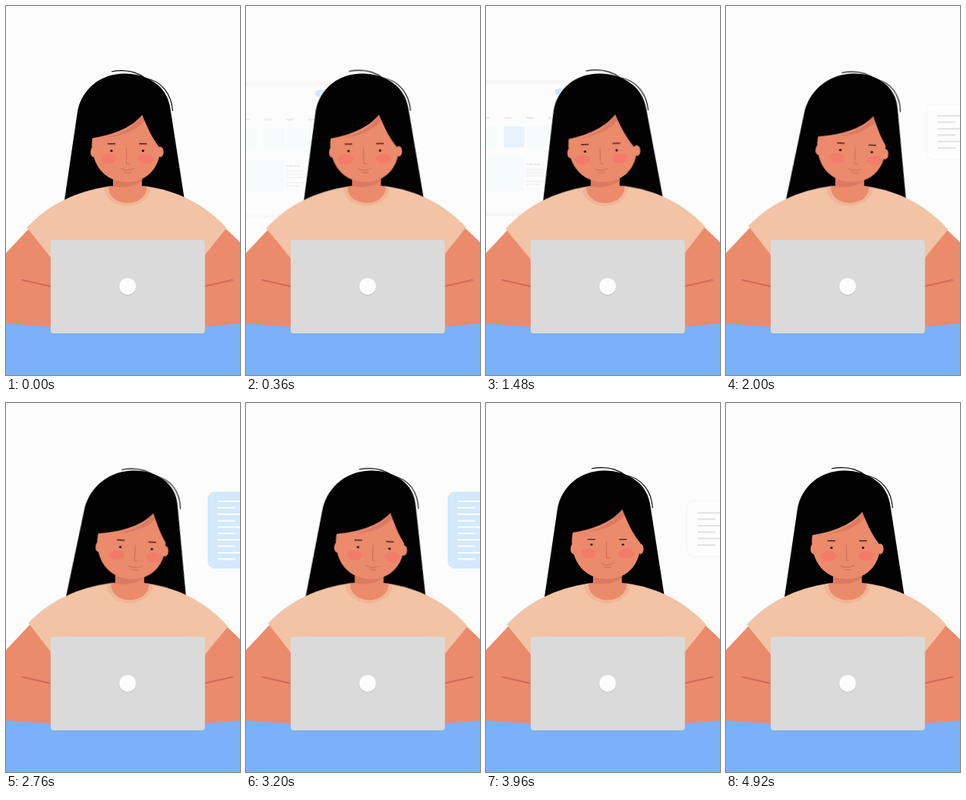
An HTML page without scripts that plays this animation: 304 by 478 pixels, repeating every 5 s.

```html
<!DOCTYPE html>
<html lang="en">
<head>
<meta charset="utf-8">
<title>Working at a laptop</title>
<style>
  html, body { margin: 0; width: 100%; height: 100%; overflow: hidden; background: #fcfcfc; }
  svg { display: block; width: 100vw; height: 100vh; }
  text { font: 3px Roboto, Arial, sans-serif; fill: #c8c8c8; }
  .bold { font-weight: 700; fill: #b0b0b0; }
  .label { fill: #e4f1fe; }

  .sway, .nod, .eyes, .page, .card, .doc, .note { animation: 5s infinite both; }
  .sway, .nod, .eyes, .card { animation-timing-function: cubic-bezier(.65, 0, .35, 1); }
  .page, .doc, .note { animation-timing-function: linear; }

  /* each part leans left, then right, by its own amount */
  .sway { animation-name: sway; }
  @keyframes sway {
    0%, 77.6%, 100% { transform: var(--mid); }
    16%, 25.6% { transform: var(--left); }
    40%, 54.8% { transform: var(--right); }
  }
  .hair {
    transform-origin: 157px 250px;
    --mid: translateX(0) skewX(0deg);
    --left: translateX(-2px) skewX(2.4deg);
    --right: translateX(2px) skewX(-3.6deg);
  }
  .strand { --mid: translate(0, 0); --left: translate(-.5px, -1px); --right: translate(1px, 1.5px); }
  .shirt {
    transform-origin: 157px 287px;
    --mid: translateX(0) rotate(0deg);
    --left: translateX(-2px) rotate(-.9deg);
    --right: translateX(2px) rotate(.9deg);
  }
  .neck { --mid: translateX(0); --left: translateX(-3.5px); --right: translateX(3px); }
  .head {
    transform-origin: 157px 210px;
    --mid: translateX(0) rotate(0deg);
    --left: translateX(-4.2px) rotate(-2.8deg);
    --right: translateX(5px) rotate(3.8deg);
  }
  .fringe { --mid: translateX(0); --left: translateX(-4px); --right: translateX(5px); }
  .features { --mid: translateX(0); --left: translateX(-5px); --right: translateX(5px); }

  .nod { animation-name: nod; }
  @keyframes nod {
    0%, 64% { transform: none; }
    78%, 82% { transform: translateY(-3.3px); }
    98.4%, 100% { transform: none; }
  }
  .eyes { animation-name: eyes; transform-origin: 157px 184px; }
  @keyframes eyes {
    0%, 74% { transform: none; }
    78.4%, 84% { transform: scaleY(.75); }
    96%, 100% { transform: none; }
  }

  .page { animation-name: page; }
  @keyframes page {
    0%, 4% { opacity: 0; transform: translateY(30px); }
    11.5%, 26% { opacity: 1; transform: none; }
    33.2%, 100% { opacity: 0; transform: translateY(30px); }
  }
  .card { animation-name: card; transform-origin: 36.5px 154.3px; }
  @keyframes card {
    0%, 11.2% { opacity: 0; transform: scale(.58); }
    12% { opacity: 1; }
    16%, 26% { opacity: 1; transform: scale(1); }
    29.4%, 100% { opacity: 1; transform: scale(.58); }
  }
  .doc { animation-name: doc; }
  @keyframes doc {
    0%, 33% { opacity: 0; }
    39.2%, 79.2% { opacity: 1; }
    87.6%, 100% { opacity: 0; }
  }
  .note { animation-name: note; }
  @keyframes note {
    0%, 47% { opacity: 0; }
    50.8%, 70% { opacity: 1; }
    77%, 100% { opacity: 0; }
  }
</style>
</head>
<body>
<svg viewBox="0 0 304 478" preserveAspectRatio="none">
  <rect width="304" height="478" fill="#fcfcfc"/>

  <!-- web page on the left -->
  <g class="page">
    <rect x="-20" y="83.5" width="144.5" height="171.5" rx="2" fill="#fcfcfc" stroke="#f1f1f1" stroke-width="5"/>
    <rect x="90" y="92" width="33" height="8.6" rx="4.3" fill="#9acbfb"/>
    <text class="bold label" x="96" y="97.5">Read more</text>
    <path fill="#f0fafb" d="M0 141h14v27H0zM24 141h26v27H24zM53 141h26v27H53zM81 141h26v27H81zM0 181.500h49.500v42.500H0z"/>
    <rect class="card" x="14" y="131.500" width="45" height="45.500" fill="#d2e9fc"/>
    <text class="bold" x="-2" y="131">Dolor</text>
    <text class="bold" x="24" y="131">Lorem</text>
    <text class="bold" x="52" y="131">Magna</text>
    <text class="bold" x="81" y="131">Aliqua</text>
    <text class="bold" x="52.500" y="190.500">Lorem ipsum</text>
    <text x="52.500" y="198">Dolor sit amet elit</text>
    <text x="52.500" y="202">sed do eiusmod in</text>
    <text x="52.500" y="206">tempor ut labore</text>
    <text x="52.500" y="213">Ut enim ad minim</text>
    <text x="52.500" y="217">quis nostrud</text>
  </g>

  <!-- document on the right -->
  <g class="doc" fill="none">
    <rect x="260.500" y="127" width="80" height="72" rx="9" fill="#fdfdfd" stroke="#f7f7f7" stroke-width="1.500"/>
    <g stroke="#e2e2e2">
      <path d="M286.500 141.200V186" stroke-width="23" stroke-dasharray="2 6.35"/>
      <path d="M304 141.200V186" stroke-width="12" stroke-dasharray="2 14.7"/>
    </g>
    <g class="note">
      <rect x="262" y="115" width="80" height="99.500" rx="9" fill="#d3e9fc"/>
      <g stroke="#fcfcfc">
        <path d="M286.500 126.500V204" stroke-width="23" stroke-dasharray="2 6.3"/>
        <path d="M304 126.500V204" stroke-width="12" stroke-dasharray="2 14.6"/>
      </g>
    </g>
  </g>

  <g class="sway hair" fill="#020202">
    <path d="M75 258 93 136C99 107 123 87.500 154 87.500C184 87.500 210 104 213.500 133L233 258Z"/>
    <path class="sway strand" d="M137 85C152 82 167 83 181 93.500C203 97 215 115 216.500 136" fill="none" stroke="#020202" stroke-width="1.1"/>
  </g>

  <!-- table and arms -->
  <path d="M0 408H304V478H0Z" fill="#7ab1fa"/>
  <path d="M0 320 32 286 80 310V417L0 411ZM304 306 283 286 240 310V417L304 411Z" fill="#ec8a6c"/>
  <path d="M21 355 60 363.500M294 355 256 363.500" stroke="#cf6a55" stroke-width="2" stroke-linecap="round"/>

  <path class="sway shirt" fill="#f3c3a5"
    d="M27 287C55 257 90 240.500 134 233.500H182C222 239 258 256.500 286.500 287.500L250 333H64Z"/>

  <g class="sway neck">
    <path d="M127 235C130 267 185 267 188 235Z" fill="#efb696"/>
    <path d="M133 234.500C134 262 182 262 183 234.500L176.500 233V215H139V233Z" fill="#ec8a6c"/>
    <path d="M139 215H176.500V226C166 235 150 236 139 233.500Z" fill="#db7a61"/>
  </g>

  <g class="sway head">
    <path fill="#ec8a6c" d="M111.500 180C112 150 130 133 157 133S200.500 150 200.500 184C199.500 212 181 228 157 228S113 212 111.500 180Z"/>
    <g class="nod">
      <g class="sway fringe">
        <path d="M130 170C151 166 167 156 177 141L180.500 149C167 162 150 169 130 170Z" fill="#db7a61"/>
        <path d="M106 172C136 168 162 159 177 141C183 156 190 172 200 184L205 181C206 150 190 124 157 124S108 145 106 172Z" fill="#020202"/>
      </g>
    </g>
    <g fill="#ec8a6c">
      <ellipse cx="114" cy="189" rx="4.2" ry="6.8"/>
      <ellipse cx="200.500" cy="189" rx="4.2" ry="6.8"/>
    </g>
    <g class="nod">
      <g class="sway features">
        <g fill="#f27b69">
          <ellipse cx="133" cy="198" rx="10" ry="6.3"/>
          <ellipse cx="182" cy="198" rx="10" ry="6.3"/>
        </g>
        <g class="eyes">
          <path d="M132 178.500H142M173 178.500H183" stroke="#4a2018" stroke-width="1.4"/>
          <g fill="#1c0c08">
            <circle cx="137" cy="187.500" r="1.6"/>
            <circle cx="178" cy="187.500" r="1.6"/>
          </g>
        </g>
        <g fill="none" stroke="#d0705a" stroke-width="1.3" stroke-linecap="round">
          <path d="M156.500 184V203.500Q158 205 160 204"/>
          <path d="M149.500 211Q158 215 166 210.500M153.500 215.500Q158 217 162 215.300"/>
        </g>
      </g>
    </g>
  </g>

  <!-- laptop -->
  <rect x="58" y="303" width="200.500" height="121" rx="4" fill="#dadada"/>
  <circle cx="158" cy="364.200" r="11" fill="#c6c6c6"/>
  <circle cx="158" cy="363.200" r="10.8" fill="#fcfcfc"/>
</svg>
</body>
</html>
```
